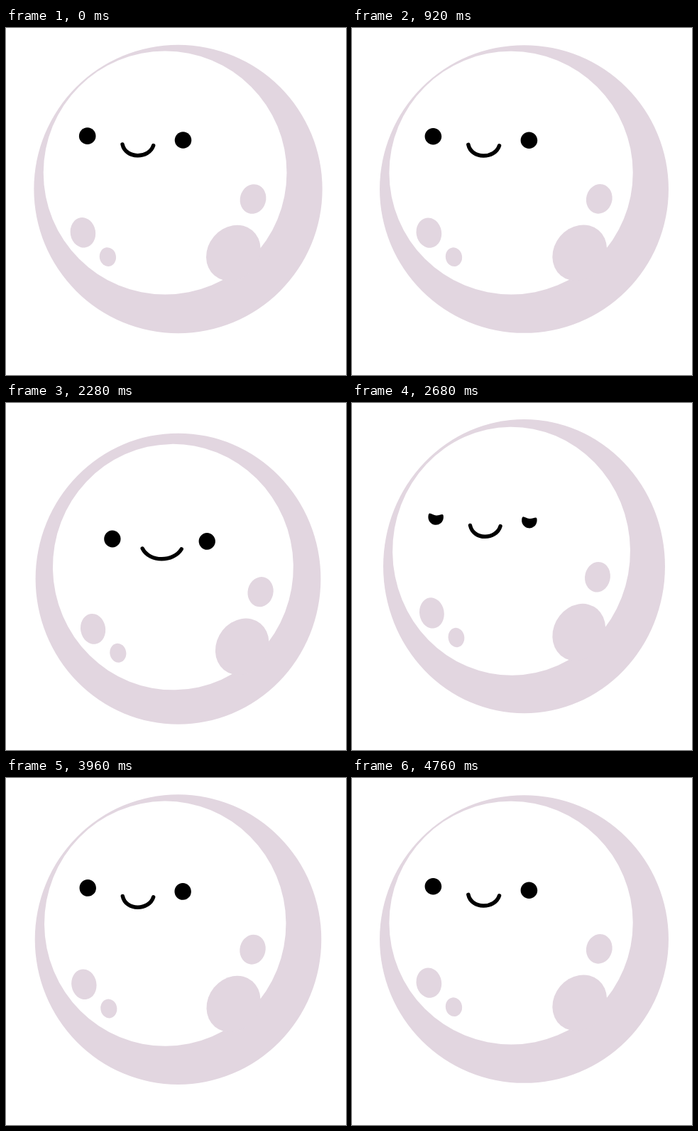
Recreate the animation shown at these times as an HTML page. Size 479 by 489 pixels, loop 4800 ms.

```html
<!DOCTYPE html>
<html lang="en">
<head>
<meta charset="utf-8">
<title>Bouncing moon</title>
<style>
  html, body { margin: 0; width: 100%; height: 100%; overflow: hidden; background: #fff; }
  svg { display: block; width: 100%; height: 100%; }
</style>
</head>
<body>
<svg viewBox="0 0 479 489">
  <ellipse id="body" cx="242.5" fill="#e2d6e0"/>
  <g id="front">
    <circle r="171.5" fill="#fff"/>
    <g fill="#e2d6e0">
      <ellipse rx="17.7" ry="21.3" transform="translate(-115.8 84.3) rotate(-10)"/>
      <ellipse rx="11.6" ry="13.4" transform="translate(-80.8 118.5) rotate(-10)"/>
      <ellipse rx="18.2" ry="21" transform="translate(124 37) rotate(15)"/>
      <ellipse rx="36" ry="41.5" transform="translate(96.3 113) rotate(40)"/>
    </g>
    <g id="face">
      <g transform="translate(-109.5 -51.8)"><path class="eye"/></g>
      <g transform="translate(25.4 -46)"><path class="eye"/></g>
      <path id="mouth" fill="none" stroke="#000" stroke-width="5.5" stroke-linecap="round"/>
    </g>
  </g>
</svg>
<script>
const LOOP = 4800, BOUNCE = 960, STEP = 40;
const $ = id => document.getElementById(id);
const body = $('body'), front = $('front'), face = $('face'), mouth = $('mouth');
const eyes = document.querySelectorAll('.eye');

const set = (el, attrs) => {
  for (const name in attrs) el.setAttribute(name, attrs[name]);
};
const ramp = (t, a, b) => {
  const x = Math.min(1, Math.max(0, (t - a) / (b - a)));
  return x * x * (3 - 2 * x);
};
const pulse = (t, a, b, c, d) => ramp(t, a, b) - ramp(t, c, d);
const bell = (t, mid, spread) => Math.exp(-(((t - mid) / spread) ** 2));

// Half-width: slim while falling, wide on impact, slim again on the rebound
const halfWidth = p =>
  203.6 - 3.4 * bell(p, 270, 190) + 17.8 * bell(p, 532.6, 46.3) - 5.8 * bell(p, 725, 100);

// A round eye whose upper lid sinks as it squints
function eyePath(squint) {
  const r = 11.8 - 0.8 * squint, low = 11.8 - 1.1 * squint;
  const lid = 9.3 * squint - 11.8, side = -6.5 - 2 * squint;
  return `M${-r} 0C${-r} ${side} -6.5 ${lid} 0 ${lid}S${r} ${side} ${r} 0A${r} ${low} 0 0 1 ${-r} 0Z`;
}

// The smile widens and flattens while looking to the right
function mouthPath(look) {
  const mid = -38.3 - 2.7 * look, half = 21.8 + 20 * look, inner = 16.5 + 2.5 * look;
  const end = -39.2 + 8.5 * look, bow = -19.3 + 5 * look, tilt = 0.8 + 0.4 * look;
  return `M${mid - half} ${end - tilt}C${mid - inner - 1} ${bow} ${mid + inner - 1} ${bow} ${mid + half} ${end + tilt}`;
}

function draw(time) {
  const t = Math.floor((time % LOOP) / STEP) * STEP;
  const p = t % BOUNCE;
  const u = 1 - Math.abs(p / (BOUNCE / 2) - 1);
  const look = pulse(t, 1160, 1600, 2000, 2440);
  const squint = pulse(p, 500, 620, 780, 880);

  const rx = halfWidth(p), sx = rx / 203.3;
  const sy = sx ** -0.85, ry = 203 * sy;
  const cy = 227 + 52 * u ** 3.2;
  set(body, { rx, ry, cy });

  const x = 242.5 - 18.4 * sx + 36.8 * look;
  const y = cy - 23 * sy + 11.8 * u * u;
  set(front, { transform: `translate(${x} ${y}) rotate(${-1.45 * u}) scale(${sx} ${sy})` });
  set(face, { transform: `translate(${79 * look + squint} ${19.5 * u * u + 0.5 * squint})` });

  const eye = { d: eyePath(squint), transform: `rotate(${5 * squint})` };
  eyes.forEach(e => set(e, eye));
  set(mouth, { d: mouthPath(look) });
}

const start = performance.now();
function tick() {
  draw(performance.now() - start);
  requestAnimationFrame(tick);
}
tick();
</script>
</body>
</html>
```
